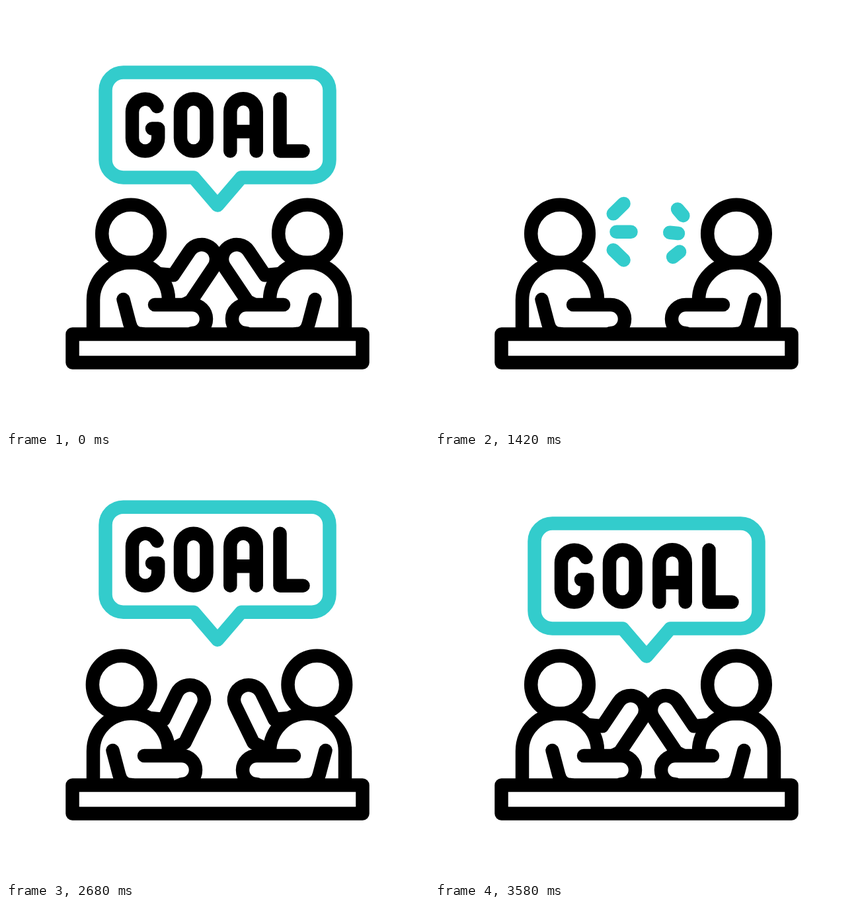
These frames come from a looping animation (640 by 640 pixels, 3600 ms). An HTML page:

```html
<!DOCTYPE html>
<html>
<head>
<meta charset="utf-8">
<style>
html, body { margin: 0; width: 100%; height: 100%; overflow: hidden; background: #fff; }
svg { display: block; width: 100vw; height: 100vh; }
.line { fill: none; stroke: #000; stroke-width: 20.5; stroke-linecap: round; stroke-linejoin: round; }
.teal { stroke: #33cccc; }
.mask { fill: #fff; }
</style>
</head>
<body>
<svg viewBox="0 0 640 640">
  <defs>
    <clipPath id="above"><rect width="640" height="492"/></clipPath>
    <g id="person">
      <g clip-path="url(#above)"><path id="arm" class="line"/></g>
      <path class="mask" d="M132 496V445a57 57 0 0 1 114 0V496Z"/>
      <circle id="head" class="line" cx="189" cy="344.5" r="43.8"/>
      <path class="line" d="M132 496V445a57 57 0 0 1 114 0V450"/>
      <g id="forearm">
        <path class="mask" d="M190 496L209 452H265.5a21.500 21.500 0 0 1 0 43Z"/>
        <path class="line" d="M209 452H265.5a21.500 21.500 0 0 1 0 43"/>
        <path class="line" d="M161.500 444L171 480Q175 496 190 496"/>
      </g>
    </g>
  </defs>
  <use href="#person"/>
  <use href="#person" transform="matrix(-1 0 0 1 645 0)"/>
  <rect class="line" style="fill:#fff" x="100.5" y="496.5" width="439" height="43"/>
  <g id="bubble">
    <path class="line teal" d="M177.500 100.500H462.500a27 27 0 0 1 27 27V232.500a27 27 0 0 1-27 27H356L320 301.500L284 259.500H177.500a27 27 0 0 1-27-27V127.500a27 27 0 0 1 27-27Z"/>
    <path class="line" d="M228.500 152A19.700 19.700 0 0 0 191 160V200a19.600 19.600 0 0 0 39.200 0V185.500H221"/>
    <rect class="line" x="264" y="140.5" width="39.5" height="79" rx="19.7"/>
    <path class="line" d="M339.300 219.500V160a19.700 19.700 0 0 1 39.400 0V219.500M339.300 190H378.700"/>
    <path class="line" d="M414.500 140.500V219.500H449.500"/>
  </g>
  <path id="leftTalk" class="line teal" transform="translate(274.5 341.7)"/>
  <path id="rightTalk" class="line teal" transform="translate(368 344) rotate(5.5) scale(-1 1)"/>
</svg>
<script>
const LOOP = 3600;
const get = id => document.getElementById(id);
const arm = get('arm'), head = get('head'), forearm = get('forearm'), bubble = get('bubble');
const leftTalk = get('leftTalk'), rightTalk = get('rightTalk');

const rad = deg => deg * Math.PI / 180;
const clamp = p => Math.max(0, Math.min(1, p));
const mix = (a, b, p) => a + (b - a) * p;
const ramp = (t, a, b) => (1 - Math.cos(Math.PI * clamp((t - a) / (b - a)))) / 2;
const pulse = (t, peak, period) => 0.5 + 0.5 * Math.cos(2 * Math.PI * (t - peak) / period);

// hand centre and tilt of the raised arm
const CLASP = { x: 296, y: 383, deg: 34 };
const RAISED = { x: 278, y: 367, deg: 26 };
const HIDDEN = { x: 205, y: 472, deg: 30 };

function blend(a, b, p) {
  return { x: mix(a.x, b.x, p), y: mix(a.y, b.y, p), deg: mix(a.deg, b.deg, p) };
}

function armPose(t) {
  if (t < 2300) return blend(CLASP, HIDDEN, ramp(t, 20, 340));
  if (t < 2740) return blend(HIDDEN, RAISED, ramp(t, 2300, 2660));
  const pose = blend(RAISED, CLASP, ramp(t, 2740, 3000));
  pose.y += 3 * ramp(t, 2800, 3000) * (1 - ramp(t, 3080, 3400));
  return pose;
}

function armPath({ x, y, deg }) {
  const r = 22, c = Math.cos(rad(deg)), s = Math.sin(rad(deg));
  const lx = x - r * c, ly = y - r * s, rx = x + r * c, ry = y + r * s;
  const ex = lx - 44 * s, ey = ly + 44 * c;
  return `M${ex - 22} ${ey - 2}L${ex} ${ey}L${lx} ${ly}` +
    `A${r} ${r} 0 0 1 ${rx} ${ry}l${-62 * s} ${62 * c}l-12 6`;
}

// three rays fanned about the x axis
function drawFan(el, length, size) {
  el.style.display = size > 0.01 ? '' : 'none';
  el.style.strokeWidth = 20.5 * size;
  el.setAttribute('d', [-44, 0, 44].map(deg => {
    const c = Math.cos(rad(deg)), s = Math.sin(rad(deg));
    return `M${17 * (c - 1)} ${39.5 * s}l${length * c} ${length * s}`;
  }).join(''));
}

function draw(t) {
  arm.style.display = t > 340 && t < 2300 ? 'none' : '';
  arm.setAttribute('d', armPath(armPose(t)));

  const lean = -19 * ramp(t, 2440, 2800) * (1 - ramp(t, 2800, 3220));
  head.setAttribute('transform', `translate(${lean} 0)`);
  const reach = 16 * (1 - ramp(t, 20, 340) + ramp(t, 3080, 3500));
  forearm.setAttribute('transform', `translate(${reach} 0)`);

  const leaving = t < 1400;
  const lift = leaving ? ramp(t, 323, 490) : ramp(t, 2440, 2800) * (1 - ramp(t, 2800, 2960));
  const scale = leaving ? 1 - ramp(t, 440, 520) : ramp(t, 2400, 2620);
  const tilt = -4 * Math.sin(3 * Math.PI * clamp((t - 2840) / 740));
  bubble.style.display = scale > 0.01 ? '' : 'none';
  bubble.setAttribute('transform',
    `translate(320 ${311 - 33 * lift}) rotate(${tilt}) scale(${scale}) translate(-320 -311)`);

  const size = ramp(t, 670, 800) * (1 - ramp(t, 2160, 2280));
  drawFan(leftTalk, mix(2, 22, pulse(t, 1420, 560)), size);
  drawFan(rightTalk, 16 * pulse(t, 1592, 1165), size);
}

const start = performance.now();
function tick() {
  draw((performance.now() - start) % LOOP);
  requestAnimationFrame(tick);
}
draw(0);
requestAnimationFrame(tick);
</script>
</body>
</html>
```
